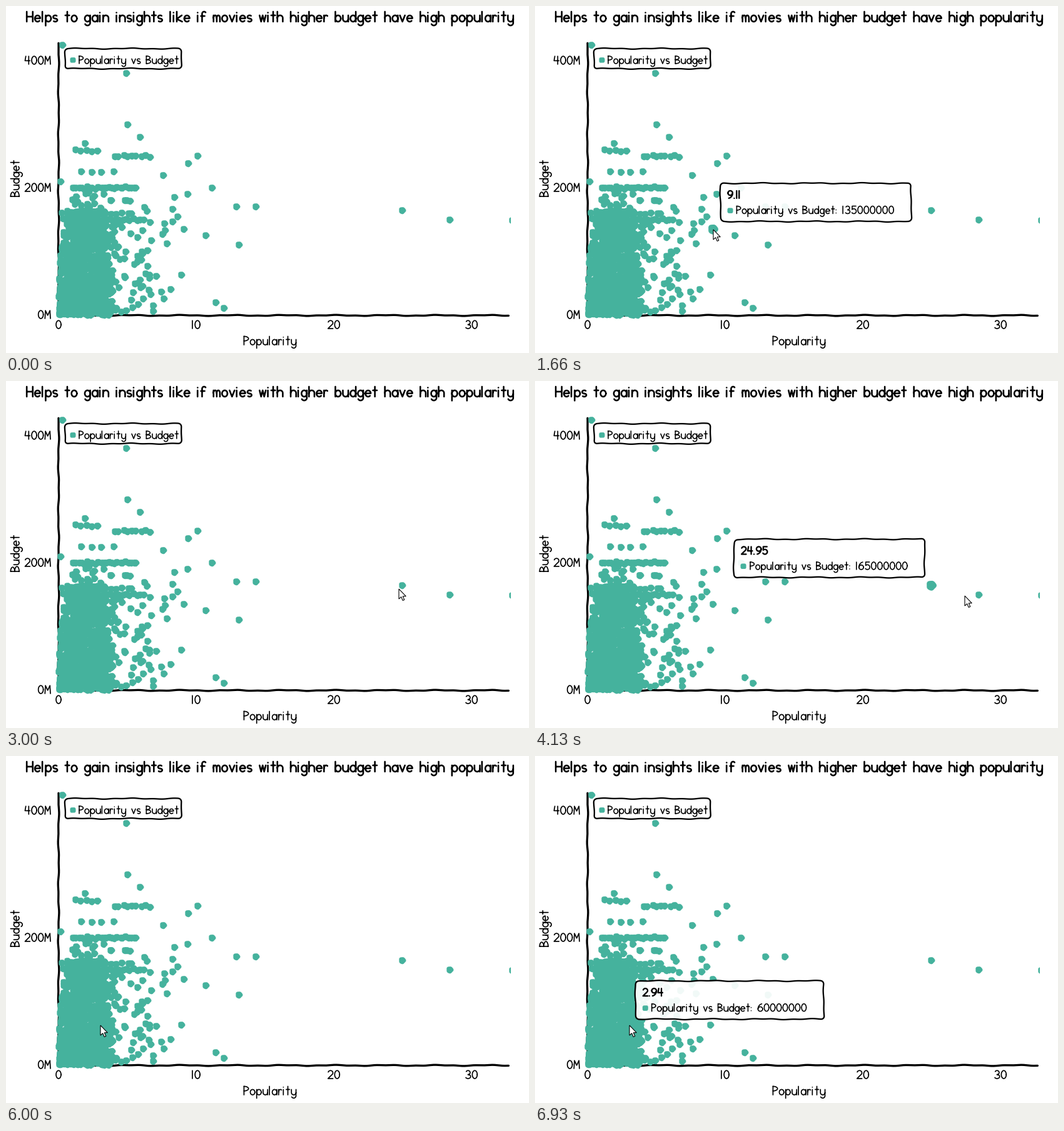
These frames come from a looping animation (836x554 px, 7 s). A matplotlib script:

```python
import numpy as np
import matplotlib.pyplot as plt
from matplotlib.animation import FuncAnimation
from matplotlib.patches import PathPatch, Polygon
from matplotlib.path import Path

W, H, DPI = 836, 554, 64
PX = 72 / DPI  # points per pixel
STEP, FRAMES = 50, 140
GREEN = "#45b29d"
LABEL = "Popularity vs Budget"

fig = plt.figure(figsize=(W / DPI, H / DPI), dpi=DPI, facecolor="white")
ax = fig.add_axes([0, 0, 1, 1])
ax.set(xlim=(0, W), ylim=(H, 0))
ax.axis("off")


# ---- hand lettering, built from a few shared strokes ----
CAP, MID, LOW = 10, 6.3, -4      # capital, small letter and descender heights
R = 2.7                          # bowl radius
WIDE = 2 * R
GAP, SPACE = 2.1, 5.8


def line(*xy):
    return np.reshape(np.array(xy, float), (-1, 2))


def arc(cx, cy, rx, ry, a0=0, a1=360):
    a = np.radians(np.linspace(a0, a1, 25))
    return np.column_stack([cx + rx * np.cos(a), cy + ry * np.sin(a)])


def join(*parts):
    return np.vstack(parts)


def post(x, top, bottom=0):
    return line(x, top, x, bottom)


def bar(x1, y):
    return line(0, y, x1, y)


def dot(y):
    return line(0, y, .1, y)


def arch(x, w):
    return join(arc(x + w / 2, 3.6, w / 2, R, 180, 0), line(x + w, 0))


def zigzag(turns, dx):
    k = np.arange(turns + 1)
    return np.column_stack([k * dx, MID * (k % 2 == 0)])


def lobe(cy, ry, w):
    return arc(0, cy, w, ry, 90, -90)


def oval(cy, ry, rx=3.1):
    return arc(3.1, cy, rx, ry)


RING = arc(R, MID / 2, R, MID / 2)
CUP = join(line(0, MID), arc(R, R, R, R, 180, 360))
TAIL = join(line(WIDE, MID), arc(R, -1, R, 2.8, 0, -150))
SIX = [oval(3, 3), arc(6.2, 3, 6.2, 7, 100, 180)]

GLYPHS = {
    "a": [RING, post(WIDE, MID)],
    "b": [post(0, CAP), RING],
    "d": [RING, post(WIDE, CAP)],
    "e": [join(line(0, 3.2), arc(R, 3.1, R, 3.1, 5, 315))],
    "f": [join(arc(3.2, 7.8, 2, 2.2, 40, 180), line(1.2, 0)), bar(3.8, 5.6)],
    "g": [RING, TAIL],
    "h": [post(0, CAP), arch(0, WIDE)],
    "i": [post(0, MID), dot(9)],
    "k": [post(0, CAP), line(5, MID, 0, R, WIDE, 0)],
    "l": [post(0, CAP)],
    "m": [post(0, MID), arch(0, 3.2), arch(3.2, 3.2)],
    "n": [post(0, MID), arch(0, WIDE)],
    "o": [RING],
    "p": [post(0, MID, LOW), RING],
    "r": [post(0, MID), arc(2.1, 3.6, 2.1, R, 180, 50)],
    "s": [arc(2.1, 4.7, 2.1, 1.6, 45, 270), arc(2.1, 1.55, 2.1, 1.55, 90, -135)],
    "t": [post(2, CAP), bar(4.1, MID)],
    "u": [CUP, post(WIDE, MID)],
    "v": [zigzag(2, 2.5)],
    "w": [zigzag(4, 1.55)],
    "y": [CUP, TAIL],
    "B": [post(0, CAP), lobe(7.6, 2.4, 5), lobe(2.6, 2.6, 5.8)],
    "H": [post(0, CAP), post(6, CAP), bar(6, 5)],
    "M": [line(0, 0, .6, CAP, 3.4, 4, 6.2, CAP, 6.8, 0)],
    "P": [post(0, CAP), lobe(7.3, 2.7, 5.3)],
    ".": [dot(0)],
    ":": [dot(.8), dot(5)],
    "0": [oval(5, 5)],
    "1": [post(0, CAP)],
    "2": [join(arc(3.1, 7.1, 3, 2.9, 160, -30), bar(6.2, 0))],
    "3": [arc(3, 7.5, 2.6, 2.5, 150, -90), arc(3, 2.5, 3.2, 2.5, 90, -150)],
    "4": [line(1, CAP, 0, 4.4, 6.2, 4.4), post(4.6, CAP)],
    "5": [join(line(5.8, CAP, .8, CAP), arc(3, 3.2, 3.2, 3.2, 135, -145))],
    "6": SIX,
    "8": [oval(7.6, 2.4, 2.5), oval(2.6, 2.6)],
    "9": [(6.2, CAP) - p for p in SIX],
}


def advance(c):
    if c == " ":
        return SPACE
    return max(max(p[:, 0].max() for p in GLYPHS[c]) + GAP, 3.3)


def text_width(s, size):
    return (sum(map(advance, s)) - GAP) * size * .08


def text(s, x, y, size, lw=1.6, align=0, upright=False, z=10):
    """Draw s with its baseline at y; align is 0 left, .5 centre, 1 right."""
    k = size * .08
    x -= align * text_width(s, size)
    paths, pen = [], 0
    for c in s:
        for p in GLYPHS.get(c, []):
            u, v = (p[:, 0] + pen) * k, p[:, 1] * k
            xy = (x - v, y - u) if upright else (x + u, y - v)
            paths.append(Path(np.column_stack(xy)))
        pen += advance(c)
    patch = PathPatch(Path.make_compound_path(*paths), fill=False, ec="black",
                      lw=lw * PX, capstyle="round", joinstyle="round", zorder=z)
    return ax.add_patch(patch)


# ---- wobbly shapes ----
def wobble(p, amp=.7):
    """Resample an outline and shift it like a rough pen."""
    d = np.r_[0, np.cumsum(np.hypot(*np.diff(p, axis=0).T))]
    s = np.linspace(0, d[-1], max(int(d[-1] / 2), 8))
    x, y = np.interp(s, d, p[:, 0]), np.interp(s, d, p[:, 1])
    dx = np.sin(y / 5 + x / 40) * .5 + np.sin(y / 13 + 1) * .8
    dy = np.sin(x / 5 + y / 40) * .5 + np.sin(x / 13 + 2) * .8
    return np.column_stack([x + amp * dx, y + amp * dy])


def box(x, y, w, h, r=5, fc="white", ec="black", lw=2.3, amp=.7, z=8):
    corners = [(x + w - r, y + h - r), (x + r, y + h - r), (x + r, y + r), (x + w - r, y + r)]
    pts = join(*[arc(cx, cy, r, r, 90 * k, 90 * k + 90)
                 for k, (cx, cy) in enumerate(corners)])
    pts = wobble(join(pts, pts[:1]), amp)
    return ax.add_patch(Polygon(pts, fc=fc, ec=ec, lw=lw * PX, joinstyle="round", zorder=z))


def swatch(x, y, z=9):
    return box(x, y, 9, 8.5, 2, fc=GREEN, ec="none", lw=0, amp=.4, z=z)


def pen_line(*xy):
    ax.plot(*wobble(line(*xy)).T, color="black", lw=3.3 * PX, zorder=1,
            solid_capstyle="round")


# ---- data: popularity against budget in millions ----
def place(pop, millions):
    return 84 + 22 * pop, 493 - 1.015 * millions


def dots(pop, millions, radius=6, z=2):
    a = np.linspace(0, 2 * np.pi, 40)
    r = 1 + .05 * np.sin(3 * a + 1) + .04 * np.sin(5 * a + 2)
    shape = Path(np.column_stack([r * np.cos(a), r * np.sin(a)]))
    return ax.scatter(*place(pop, millions), s=(2 * radius * PX) ** 2, marker=shape,
                      color=GREEN, lw=0, zorder=z)


HOVERED = [(8.64, 155), (10.68, 125), (9.11, 135), (24.95, 165), (28.42, 150), (2.94, 60)]
LONERS = [(.25, 425), (4.9, 380), (5, 300), (5.9, 280), (1.9, 270), (7.6, 220), (9.4, 238),
          (10.1, 250), (11.15, 200), (12.9, 170), (14.3, 170), (13.1, 110), (11.4, 20),
          (12, 11), (32.95, 149), (9.35, 190), (8.4, 185), (.15, 210), (8.9, 63)]
# budget, lowest and highest popularity, count: round budgets are common
ROWS = [(258, 1.2, 2.9, 5), (250, 4.1, 6.6, 9), (225, 1.6, 4, 4), (200, 1, 5.7, 24),
        (160, .2, 5.4, 14), (150, .3, 6.2, 24)]

rng = np.random.default_rng(11)


def crowd(n):
    b = 164 * rng.random(n) ** 1.2
    low, high = .7 * (b / 164) ** 3, 3.75 - .4 * (b / 164) ** 3
    return low + (high - low) * rng.random(n), b


def fringe(n):
    return 3.8 + 4.6 * rng.random(n) ** 1.9, rng.uniform(3, 185, n)


def crest(n):
    return rng.uniform(1, 3.8, n), 160 + 35 * rng.random(n) ** 1.4


def row(budget, low, high, n):
    pop = np.linspace(low, high, n) + rng.normal(0, .06, n)
    return pop, budget + rng.normal(0, 1, n)


for group in [crowd(950), fringe(85), crest(26), np.array(HOVERED + LONERS).T]:
    dots(*group)
for spec in ROWS:
    dots(*row(*spec))

# ---- static chart ----
pen_line(84, 59, 84, 494)
pen_line(84, 494, 803, 494)
ax.axvspan(807, W, color="white", lw=0, zorder=3)

text("Helps to gain insights like if movies with higher budget have high popularity",
     422, 25, 20, 2.6, .5)
text("Popularity", 422, 541, 17, 1.7, .5)
text("Budget", 21, 304, 17, 1.7, upright=True)
for value in (0, 200, 400):
    text(f"{value}M", 71, place(0, value)[1] + 6, 16, 1.7, 1)
for value in (0, 10, 20, 30):
    text(str(value), place(value, 0)[0], 515, 16, 1.7, .5)

box(94, 68, 186, 32)
swatch(102, 82.5)
text(LABEL, 117, 92, 15.2)


# ---- tooltips ----
def tooltip(pop, millions):
    x, y = place(pop, millions)
    label = f"{LABEL}: {millions}000000"
    w = text_width(label, 15) + 54
    x0 = x - 10 - w if x > W / 2 else x + 12
    y0 = y - 73
    return [
        dots(pop, millions, 8.5, z=11),
        box(x0, y0, w, 61, fc=(1, 1, 1, .93), z=12),
        text(f"{pop:.2f}", x0 + 12, y0 + 24, 15, 2.3, z=13),
        swatch(x0 + 11, y0 + 39, z=13),
        text(label, x0 + 26, y0 + 48.5, 15, z=13),
    ]


# visible from and until, in ms, for each hovered dot
SHOWN = [(180, 240), (240, 530), (1660, 2260), (3060, 4200), (4800, 5330), (6400, 7000)]
TIPS = [(span, tooltip(*point)) for span, point in zip(SHOWN, HOVERED)]

# ---- pointer: each move has start and end in ms and a goal ----
ENTRY, ENTRY_MS = (96, 482), 60
MOVES = [(60, 260, (319, 368)), (530, 600, (326, 376)), (930, 1530, (285, 357)),
         (2260, 2930, (628, 332)), (3530, 4130, (687, 343)), (4260, 4660, (709, 345)),
         (5330, 5860, (151, 430))]
ARROW = line(0, 0, 0, 16, 3.7, 12.6, 6.2, 18.4, 8.8, 17.3, 6.3, 11.7, 11.3, 11.7)
pointer = ax.add_patch(Polygon(ARROW, fc="white", ec="black", lw=1.1 * PX, zorder=20))


def pointer_at(ms):
    pos = np.array(ENTRY, float)
    for start, end, goal in MOVES:
        t = np.clip((ms - start) / (end - start), 0, 1)
        pos += (np.array(goal) - pos) * t * t * (3 - 2 * t)
    return pos


def update(i):
    ms = (i + .5) * STEP
    for (start, end), parts in TIPS:
        for part in parts:
            part.set_visible(start <= ms < end)
    pointer.set_visible(ms >= ENTRY_MS)
    pointer.set_xy(ARROW + pointer_at(ms))
    return [pointer]


anim = FuncAnimation(fig, update, frames=FRAMES, interval=STEP,
                     repeat=True, repeat_delay=0, blit=False)
plt.show()
```
